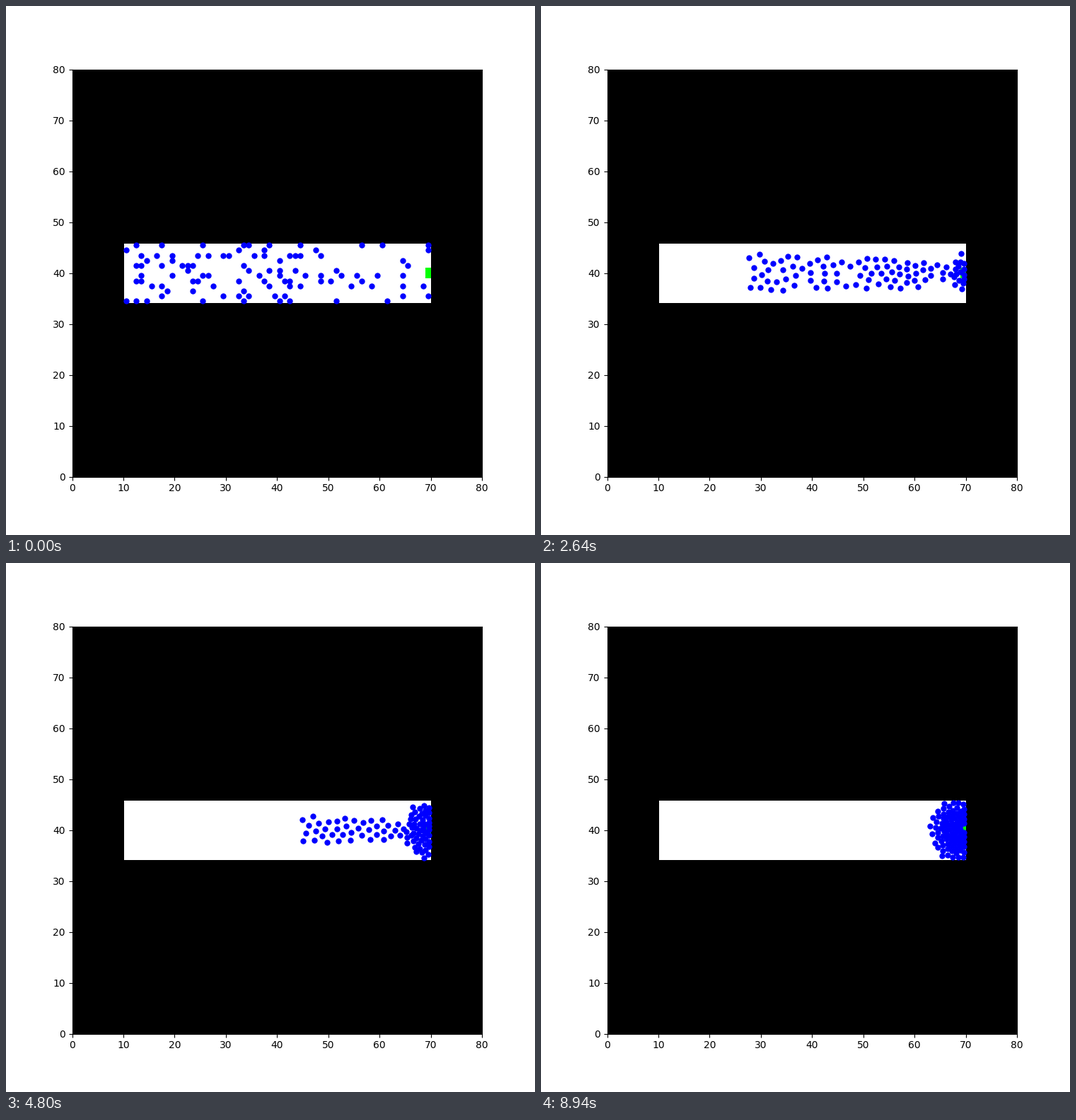
Write a matplotlib script that moves like this. It is 748 by 748 pixels and loops after 9000 ms.

```python
import numpy as np
import matplotlib.pyplot as plt
from matplotlib.animation import FuncAnimation
from matplotlib.patches import Rectangle

FRAMES, INTERVAL, SUBSTEPS = 150, 60, 4
LEFT, RIGHT, BOTTOM, TOP = 10, 70, 34, 46
EXIT = np.array([70.0, 40.0])

SPEED, RELAX = 0.491, 9.2        # desired speed per frame, relaxation in frames
PUSH, WALL_PUSH, RANGE = 0.04, 0.055, 0.25
STIFF = 0.6                      # contact stiffness
DOOR_REACH, DOOR_PAUSE = 0.7, 8  # who may leave, and how often

# Starting cells of the crowd: row -> columns
ROWS = {
    45: [12, 17, 25, 33, 34, 38, 44, 56, 60, 69],
    44: [10, 32, 37, 47, 69],
    43: [13, 16, 19, 24, 26, 29, 30, 35, 37, 42, 43, 44, 48],
    42: [14, 19, 40, 64],
    41: [12, 13, 17, 21, 22, 23, 33, 65],
    40: [22, 34, 38, 40, 43, 51],
    39: [13, 19, 25, 26, 36, 40, 45, 48, 52, 55, 59, 64],
    38: [12, 13, 23, 24, 32, 37, 41, 42, 48, 50, 56],
    37: [15, 17, 27, 38, 42, 44, 54, 58, 64, 68],
    36: [18, 23, 33],
    35: [17, 29, 32, 34, 39, 41, 64, 69],
    34: [10, 12, 14, 25, 33, 40, 42, 51, 61],
}


def repel(gap, strength):
    """Soft push at a distance plus a stiff one on contact (gap < 0)."""
    soft = strength * np.exp(-np.maximum(gap, -0.2) / RANGE)
    return soft + STIFF * np.maximum(-gap, 0)


def acceleration(pos, vel):
    to_exit = EXIT - pos
    dist = np.hypot(*to_exit.T)[:, None]
    acc = (SPEED * to_exit / np.maximum(dist, 0.1) - vel) / RELAX

    diff = pos[:, None] - pos[None]
    d = np.hypot(diff[..., 0], diff[..., 1])
    np.fill_diagonal(d, 99)
    d = np.maximum(d, 0.05)
    acc += (diff * (repel(d - 1, PUSH) / d)[..., None]).sum(axis=1)

    x, y = pos.T
    acc[:, 0] += repel(x - LEFT - 0.5, WALL_PUSH) - repel(RIGHT - 0.5 - x, WALL_PUSH)
    acc[:, 1] += repel(y - BOTTOM - 0.5, WALL_PUSH) - repel(TOP - 0.5 - y, WALL_PUSH)
    return acc


def simulate():
    pos = np.array([(x + 0.5, y + 0.5) for y, xs in ROWS.items() for x in xs])
    vel = np.zeros_like(pos)
    path, last_exit = [pos.copy()], 0
    for n in range(1, FRAMES):
        for _ in range(SUBSTEPS):
            vel += acceleration(pos, vel) / SUBSTEPS
            pos += vel / SUBSTEPS
            pos = np.clip(pos, (LEFT + 0.4, BOTTOM + 0.4), (RIGHT - 0.4, TOP - 0.4))
        dist = np.hypot(*(pos - EXIT).T)
        first = dist.argmin()
        if dist[first] < DOOR_REACH and n - last_exit >= DOOR_PAUSE:
            pos, vel = np.delete(pos, first, 0), np.delete(vel, first, 0)
            last_exit = n
        path.append(pos.copy())
    return path


path = simulate()

fig, ax = plt.subplots(figsize=(7.48, 7.48), dpi=100)
ax.set(xlim=(0, 80), ylim=(0, 80), facecolor="black")
ax.add_patch(Rectangle((10.15, 34.12), 59.87, 11.72, color="white", lw=0))
ax.add_patch(Rectangle((69, 39), 1.02, 2.1, color="lime", lw=0))
dots, = ax.plot([], [], "o", color="blue", ms=5)


def draw(n):
    dots.set_data(*path[n].T)
    return dots,


anim = FuncAnimation(fig, draw, frames=FRAMES, interval=INTERVAL,
                     repeat=True, repeat_delay=0)
plt.show()
```
